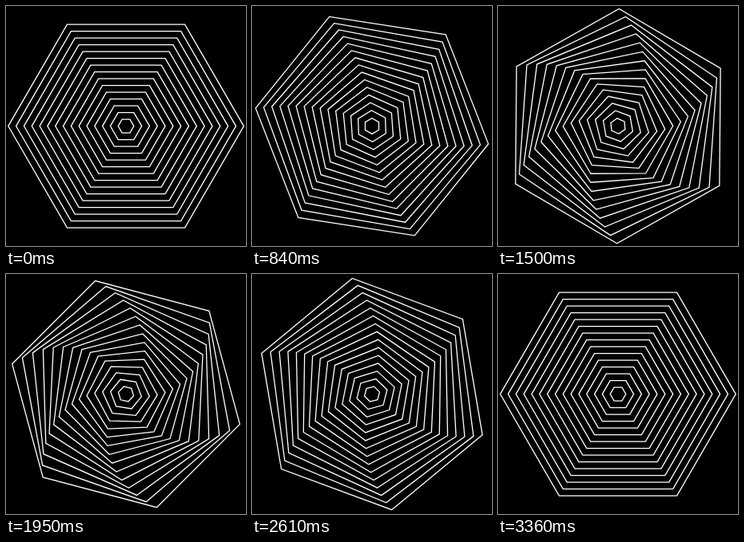
Write an HTML page with a canvas that moves like this. It is 300x301 px and loops after 3.39 s.

```html
<!DOCTYPE html>
<html lang="en">
<head>
<meta charset="utf-8">
<title>Turning hexagons</title>
<style>
  html, body { margin: 0; width: 100%; height: 100%; overflow: hidden; background: #000; }
  canvas { display: block; }
</style>
</head>
<body>
<canvas id="stage" width="300" height="301"></canvas>
<script>
const ctx = document.getElementById('stage').getContext('2d');
const LOOP = 3390, STEP = 30;
const RINGS = 15, RADIUS = 147.2;
const TURN = 2702;                 // ms one ring needs for a full turn
const FIRST = 290, STAGGER = 18;   // start of the inner ring, delay per ring outwards

const clamp = x => Math.min(1, Math.max(0, x));
const easeInOut = x => x < 0.5 ? 2 * x * x : 1 - 2 * (1 - x) ** 2;

function hexagon(radius, angle) {
  ctx.beginPath();
  for (let i = 0; i < 6; i++) {
    const a = angle + i * Math.PI / 3;
    ctx.lineTo(150 + radius * Math.cos(a), 150.6 + radius * Math.sin(a));
  }
  ctx.closePath();
  ctx.stroke();
}

function draw(time) {
  ctx.fillStyle = '#000';
  ctx.fillRect(0, 0, 300, 301);
  ctx.strokeStyle = '#fff';
  ctx.lineWidth = 1.3;
  for (let ring = 0; ring < RINGS; ring++) {
    const progress = clamp((time - FIRST - ring * STAGGER) / TURN);
    hexagon(RADIUS * (ring + 1) / RINGS, 2 * Math.PI * easeInOut(progress));
  }
}

const start = performance.now();
function tick() {
  const time = (performance.now() - start) % LOOP;
  draw(Math.floor(time / STEP) * STEP);
  requestAnimationFrame(tick);
}
tick();
</script>
</body>
</html>
```
